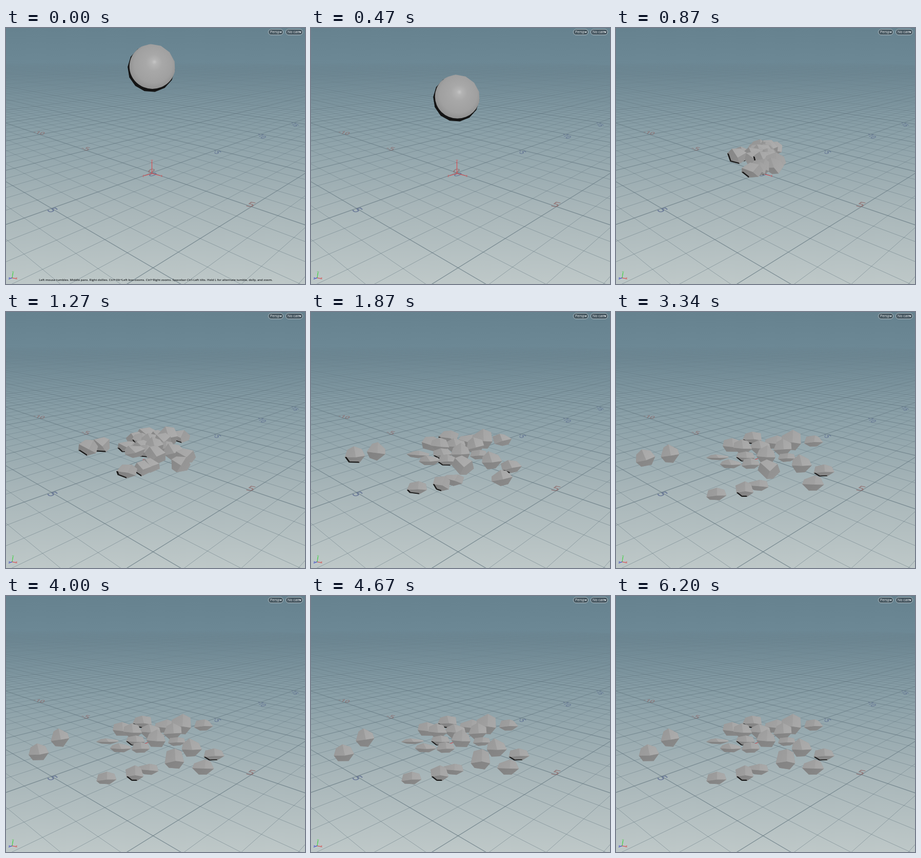
These frames come from a looping animation (583x500 px, 6.27 s). An HTML page with a canvas:

```html
<!DOCTYPE html>
<html lang="en">
<head>
<meta charset="utf-8">
<title>Shattering sphere</title>
<style>
html, body { margin: 0; width: 100%; height: 100%; overflow: hidden; background: #8ba0a8; }
canvas { display: block; width: 583px; height: 500px; }
</style>
</head>
<body>
<canvas id="stage" width="583" height="500"></canvas>
<script>
const W = 583, H = 500, LOOP = 6270, STEP = 66.7, IMPACT = 12;
const ctx = document.getElementById('stage').getContext('2d');
const FONT = '"Open Sans", "Noto Sans", sans-serif';
const grey = v => `rgb(${v},${v},${v})`;
const mix = (a, b, u) => a + (b - a) * u;
const clamp01 = u => Math.max(0, Math.min(1, u));
const easeOut = u => 1 - (1 - u) * (1 - u);

function poly(c, pts, fill) {
  c.beginPath();
  pts.forEach(([x, y], i) => i ? c.lineTo(x, y) : c.moveTo(x, y));
  c.closePath();
  c.fillStyle = fill;
  c.fill();
}

function line(c, x0, y0, x1, y1, color, width = 1) {
  c.strokeStyle = color;
  c.lineWidth = width;
  c.beginPath();
  c.moveTo(x0, y0);
  c.lineTo(x1, y1);
  c.stroke();
}

// ---- ground plane in perspective ----
const PX = 0.041, PZ = 0.0438;
function ground(x, z) {
  const w = 1 - PX * x - PZ * z;
  return [284.6 + (30.85 * x - 30.6 * z) / w, 282.8 + (10.52 * x + 10.86 * z) / w];
}

function gridLine(c, k, alongX, color, width) {
  const end = alongX ? (0.8 - PZ * k) / PX : (0.8 - PX * k) / PZ;
  const at = s => alongX ? ground(s, k) : ground(k, s);
  line(c, ...at(-95), ...at(end), color, width);
}

function fade(c, far, near) {
  const g = c.createLinearGradient(0, 66, 0, 420);
  [[0, 0], [0.07, far * 0.4], [0.3, far], [1, near]]
    .forEach(([at, a]) => g.addColorStop(at, `rgba(92,112,122,${a})`));
  return g;
}

function floorText(c, text, x, y, size, rgb, m) {
  c.save();
  c.transform(...m, x, y);
  c.font = `600 ${size}px ${FONT}`;
  c.textAlign = 'center';
  c.textBaseline = 'middle';
  c.fillStyle = `rgba(${rgb},.65)`;
  c.fillText(text, 0, 0);
  c.restore();
}

function pill(c, x, w, text) {
  c.beginPath();
  c.roundRect(x, 2.5, w, 11, 5.5);
  c.fillStyle = 'rgba(58,70,78,.72)';
  c.fill();
  c.strokeStyle = 'rgba(205,215,220,.75)';
  c.lineWidth = 1;
  c.stroke();
  c.font = `7px ${FONT}`;
  c.fillStyle = '#e8ecee';
  c.textAlign = 'left';
  c.textBaseline = 'alphabetic';
  c.fillText(text, x + 3.5, 10.3);
  poly(c, [[x + w - 7, 7], [x + w - 2.5, 7], [x + w - 4.75, 9.7]], '#e8ecee');
}

function axes(c, x, y, arms, size) {
  for (const [label, dx, dy, color] of arms) {
    line(c, x, y, x + dx, y + dy, color, 1.1);
    c.font = `${size}px ${FONT}`;
    c.textAlign = 'center';
    c.textBaseline = 'middle';
    c.fillStyle = color;
    c.fillText(label, x + dx * 1.14, y + dy * 1.14);
  }
}

function makeScene() {
  const cv = document.createElement('canvas');
  cv.width = W;
  cv.height = H;
  const c = cv.getContext('2d');
  const sky = c.createLinearGradient(0, 0, 0, H);
  [[0, '#66828f'], [0.14, '#6c8895'], [0.4, '#8aa0a8'], [0.7, '#a8b6b9'], [1, '#bec8c8']]
    .forEach(([at, color]) => sky.addColorStop(at, color));
  c.fillStyle = sky;
  c.fillRect(0, 0, W, H);

  const thin = fade(c, 0.38, 0.58), bold = fade(c, 0.45, 0.66);
  for (let k = -90; k <= 18; k++) {
    const major = k % 5 === 0;
    for (const alongX of [true, false]) gridLine(c, k, alongX, major ? bold : thin, major ? 1.3 : 0.8);
  }

  // distance labels along both axes
  for (let k = 5; k >= -15; k -= 5) {
    const size = 19 / (1 - 0.042 * k) + 1;
    const [ax, ay] = ground(k, 0), [bx, by] = ground(0, k);
    if (k > -15) floorText(c, k, ax - 2, ay - 3, size, '140,98,98', [1, 0.2, -0.5, 0.5]);
    floorText(c, k, bx, by + 4, size, '80,96,136', [0.5, 0.42, -0.9, 0.35]);
  }

  const red = '#e0484c';
  axes(c, 284.5, 284, [['y', 0, -22, red], ['x', 16.5, 4.5, red], ['z', -14.5, 4.5, red]], 7);
  axes(c, 12, 488, [['y', 1.5, -9, '#35d435'], ['x', 7.5, 1.5, '#d83a3a'], ['z', -5, 1.5, '#2a35c8']], 6.5);
  pill(c, 511.5, 29, 'Persp');
  pill(c, 545.5, 33, 'No cam');
  return cv;
}

// ---- sphere ----
function ball(y, r) {
  const x = 283.5, facets = 14;
  const ring = (cx, cy, rad, turn) => Array.from({ length: facets }, (_, i) => {
    const a = (i + turn) / facets * Math.PI * 2;
    return [cx + rad * Math.cos(a), cy + rad * Math.sin(a)];
  });
  poly(ctx, ring(x - 0.3, y + 1, r, 0.15), '#141414');
  const g = ctx.createRadialGradient(x + 6, y - 12, 0, x + 3, y - 6, r * 1.15);
  [[0, 198], [0.1, 180], [0.3, 168], [0.7, 160], [1, 138]]
    .forEach(([at, v]) => g.addColorStop(at, grey(v)));
  ctx.save();
  poly(ctx, ring(x, y, r + 0.7, 0.4), 'transparent');
  ctx.clip();
  ctx.beginPath();
  ctx.ellipse(x + 2, y - 3, r * 0.97, r * 0.95, 0, 0, 7);
  ctx.fillStyle = g;
  ctx.fill();
  ctx.restore();
}

// ---- rocks ----
let seed = 11;
function rand() {
  seed = (seed * 16807) % 2147483647;
  return seed / 2147483647;
}

// resting place and height, then how far a late roll still has to go
const rocks = [
  [64, 308, 35, -7, -22], [105, 277, 36], [198, 284, 11], [226, 261, 28], [246, 264, 30], [267, 246, 24],
  [223, 297, 18], [253, 283, 20], [262, 296, 22], [281, 264, 28], [292, 280, 36], [310, 255, 26],
  [325, 265, 32], [342, 251, 38], [384, 252, 21], [332, 284, 17], [361, 297, 36], [331, 319, 39, -33, -12],
  [405, 310, 23], [385, 334, 31], [195, 356, 26], [250, 347, 31], [277, 338, 22]
].map(([x, y, h, dx = 0, dy = 0]) => {
  const corners = Array.from({ length: 7 }, (_, i) => ({
    a: (i + rand() * 0.5) / 7 * Math.PI * 2,
    r: 0.94 + rand() * 0.16
  }));
  return { x, y, h, dx, dy, corners, w: 35 + rand() * 7, spin: (rand() - 0.5) * 5, dark: rand() };
});

// burst outwards from the sphere, slow down, then settle
function pose(r, n) {
  const e = easeOut(clamp01((n - IMPACT) / 26));
  const late = 1 - easeOut(clamp01((n - 50) / 14));
  const x = r.x + r.dx * late, y = r.y + r.dy * late;
  return {
    r,
    x: mix(284, x, 0.15 + 0.85 * e),
    y: mix(246 + (y - 283) * 0.35, y, e),
    h: mix(r.w * 0.8, r.h, e),
    turn: r.spin * (1 - e) + r.dx * late * 0.03,
    dark: r.dark < mix(0.75, 0.35, e)
  };
}

function drawRock({ r, x, y, h, turn, dark }) {
  const n = r.corners.length;
  const at = (i, s = 1) => {
    const { a, r: rad } = r.corners[i % n];
    return [x + Math.cos(a + turn) * rad * s * r.w / 2, y + Math.sin(a + turn) * rad * s * h / 2];
  };
  const middle = (from, to) => {
    const a = r.corners[from].a, b = r.corners[to % n].a + (to >= n ? Math.PI * 2 : 0);
    return (a + b) / 2 + turn;
  };
  const hub = [x + r.w * 0.05, y + h * 0.1];
  const outline = r.corners.map((_, i) => at(i));
  poly(ctx, outline, grey(150));
  // three facets, lit from above
  for (const [from, to] of [[0, 3], [3, 5], [5, n]]) {
    const m = middle(from, to), v = 151 - 19 * Math.sin(m) + 6 * Math.cos(m);
    const facet = [hub];
    for (let i = from; i <= to; i++) facet.push(at(i));
    const g = ctx.createLinearGradient(x - r.w / 2, y - h / 2, x + r.w / 2, y + h / 2);
    g.addColorStop(0, grey(v - 5));
    g.addColorStop(1, grey(v + 5));
    poly(ctx, facet, g);
  }
  if (!dark) return;
  for (let i = 0; i < n; i++) {
    const m = middle(i, i + 1);
    if (0.8 * Math.sin(m) - 0.6 * Math.cos(m) > 0.72) {
      poly(ctx, [at(i), at(i + 1), at(i + 1, 0.84), at(i, 0.84)], grey(24));
    }
  }
}

// ---- playback ----
const scene = makeScene();
const HINT = 'Left mouse tumbles. Middle pans. Right dollies. Ctrl+Alt+Left box-zooms. Ctrl+Right zooms. ' +
  'Spacebar-Ctrl-Left tilts. Hold L for alternate tumble, dolly, and zoom.';

function draw(n) {
  ctx.drawImage(scene, 0, 0);
  if (n <= IMPACT) {
    ball(Math.min(78 + 1.2 * n * n, 246), 46.2 - n * 0.15);
  } else {
    rocks.map(r => pose(r, n))
      .sort((a, b) => a.y + a.h / 2 - b.y - b.h / 2)
      .forEach(drawRock);
  }
  if (n === 0) {
    ctx.font = `600 5.95px ${FONT}`;
    ctx.textAlign = 'center';
    ctx.textBaseline = 'alphabetic';
    ctx.fillStyle = '#1c2022';
    ctx.fillText(HINT, 292, 494);
  }
}

const start = performance.now();
function tick() {
  const t = (performance.now() - start) % LOOP;
  draw(Math.min(93, Math.floor((t + 5) / STEP)));
  requestAnimationFrame(tick);
}
tick();
</script>
</body>
</html>
```
